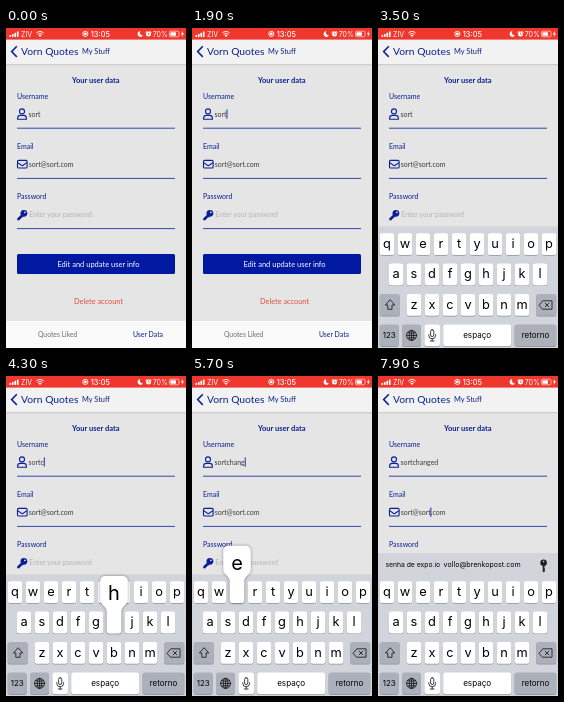
An HTML page for the animation above (8000 ms loop, 180 by 320 pixels).

```html
<!DOCTYPE html>
<html lang="en">
<head>
<meta charset="utf-8">
<title>User data form</title>
<style>
html, body { margin: 0; width: 100%; height: 100%; overflow: hidden; background: #e5e5e5; }
svg { display: block; width: 100vw; height: 100vh; }
text { font-family: Lato, "Open Sans", sans-serif; font-size: 7px; fill: #0a2090; white-space: pre; }
.sys, .sys text { font-family: Inter, Roboto, sans-serif; fill: #000; }
.status text { fill: #fff; }
.mid { text-anchor: middle; }
.line { fill: none; stroke: #0a1e96; }
.glyph { fill: none; stroke: #111; stroke-width: .8; stroke-linejoin: round; stroke-linecap: round; }
#balloon { filter: drop-shadow(0 .6px 1.4px rgba(0, 0, 0, .4)); }
</style>
</head>
<body>
<svg id="stage" viewBox="0 0 180 320" preserveAspectRatio="none">
  <defs>
    <linearGradient id="shade" x1="0" y1="0" x2="0" y2="1">
      <stop offset="0" stop-color="#c6c6c6"/><stop offset="1" stop-color="#e5e5e5"/>
    </linearGradient>
  </defs>
  <rect width="180" height="320" fill="#e5e5e5"/>

  <!-- header -->
  <rect y="11" width="180" height="25" fill="#f2f2f2"/>
  <rect y="36" width="180" height="2" fill="url(#shade)"/>
  <path class="line" d="M10.8 18.3 5.6 23.6 10.8 28.9" stroke-width="1.5"/>
  <text x="15" y="27.2" style="font-size:10.3px">Vorn Quotes</text>
  <text x="76" y="26.4" style="font-size:7.4px">My Stuff</text>

  <!-- status bar -->
  <g class="sys status">
    <rect width="180" height="11.6" fill="#f0372d"/>
    <g fill="#fff">
      <rect x="3.4" y="6.9" width="1.7" height="2" rx=".4"/>
      <rect x="5.9" y="5.9" width="1.7" height="3" rx=".4"/>
      <rect x="8.4" y="4.7" width="1.7" height="4.2" rx=".4"/>
      <rect x="10.9" y="3.4" width="1.7" height="5.5" rx=".4"/>
      <path d="M34 9.1 32.5 7.5A2.2 2.2 0 0 1 35.5 7.5Z"/>
      <circle cx="79.3" cy="5.9" r="1.4"/>
      <path d="M134.3 3.1A2.9 2.9 0 1 0 137 7.4 2.8 2.8 0 0 1 134.3 3.1Z"/>
      <circle cx="142.5" cy="6.1" r="2.5"/>
      <rect x="164.4" y="4.2" width="5.6" height="3.6" rx=".6"/>
      <path d="M177 2.8 174.8 6.3H176.2L175.6 9.1 178 5.4H176.5Z"/>
    </g>
    <g fill="none" stroke="#fff" stroke-width=".9">
      <path d="M31.6 6.5A3.4 3.4 0 0 1 36.4 6.5M30.3 5A5.3 5.3 0 0 1 37.7 5"/>
      <circle cx="79.3" cy="5.9" r="2.6"/>
      <path d="M139.7 4.6 141.2 3.1M145.3 4.6 143.8 3.1"/>
      <rect x="163.4" y="3.2" width="9.6" height="5.6" rx="1.3" stroke-width=".6"/>
    </g>
    <path d="M142.5 4.6V6.3H143.8" fill="none" stroke="#f0372d" stroke-width=".6"/>
    <text x="15" y="8.5" style="font-size:7px">ZIV</text>
    <text class="mid" x="94.3" y="8.6" style="font-size:7.4px;font-weight:500">13:05</text>
    <text x="146.7" y="8.5" style="font-size:7px">70%</text>
  </g>

  <!-- form -->
  <text class="mid" x="89.8" y="54.9" style="font-size:7.5px;font-weight:700">Your user data</text>
  <text x="11" y="70.6">Username</text>
  <text x="11" y="120.7">Email</text>
  <text x="11" y="171">Password</text>
  <path class="line" d="M11 100.2H169M11 150.4H169M11 200.6H169" stroke-width=".8"/>
  <g class="line" stroke-width="1.1">
    <circle cx="16" cy="83.4" r="2.5"/>
    <path d="M11.6 91.2V90.2Q11.6 87.4 14.4 87.4H17.6Q20.4 87.4 20.4 90.2V91.2Z"/>
    <rect x="11.5" y="132.4" width="9.6" height="7.6" rx="1.1"/>
    <path d="M11.7 134.6 15.4 137.3Q16.3 137.9 17.2 137.3L20.9 134.6"/>
  </g>
  <path d="M15 186.8 11.2 190.6V192.3H13.8V191H15V189.8H16.2L17.3 188.6Z" fill="#0a1e96"/>
  <circle cx="17.9" cy="185.3" r="3.4" fill="#0a1e96"/>
  <circle cx="18.9" cy="184.3" r=".9" fill="#e5e5e5"/>
  <text id="user" x="22.4" y="88.5" style="fill:#3a3a3a"></text>
  <text id="mail" x="22.8" y="138.7" style="fill:#3a3a3a">sort@sort.com</text>
  <text x="23.2" y="189.3" style="fill:#b4b4b8">Enter your password</text>
  <rect id="caret" width="1" height="9.4" fill="#2038a8"/>

  <rect x="11" y="226" width="158" height="20" rx="1.6" fill="#0019a0"/>
  <text class="mid" x="92.5" y="238.6" style="font-size:7.5px;fill:#fff">Edit and update user info</text>
  <text class="mid" x="92.5" y="275.6" style="font-size:7.4px;fill:#dc503c">Delete account</text>
  <rect y="293" width="180" height="27" fill="#fafafa"/>
  <text class="mid" x="51.7" y="308.6" style="font-size:6.8px;fill:#6c6c70">Quotes Liked</text>
  <text class="mid" x="142" y="308.6" style="font-size:6.9px">User Data</text>

  <!-- keyboard -->
  <g id="board" class="sys">
    <g id="bar">
      <rect y="177" width="180" height="23" fill="#d1d4da"/>
      <text x="7.4" y="191.4" style="font-size:6.8px">senha de expo.io</text>
      <text x="65.6" y="191.4" style="font-size:7.1px">vollo@brenkopost.com</text>
      <circle cx="165.6" cy="186.8" r="3.3" fill="#222"/>
      <circle cx="165.6" cy="185.6" r=".8" fill="#d1d4da"/>
      <path d="M164.7 189V195.4L165.7 196.6 167.2 195 166.4 194 167.2 193 166.5 192V189Z" fill="#222"/>
    </g>
    <rect y="198.5" width="180" height="122" fill="#d1d4da"/>
    <g id="keys"></g>
    <g class="glyph">
      <path d="M11.9 272 7.4 277H9.8V281.3H14V277H16.4Z"/>
      <path d="M161.3 277 164.8 272.8H174V281.2H164.8ZM167.2 275.2 170.8 278.8M170.8 275.2 167.2 278.8"/>
      <circle cx="33.6" cy="307.4" r="5"/>
      <ellipse cx="33.6" cy="307.4" rx="2.3" ry="5"/>
      <path d="M28.6 307.4H38.6M33.6 302.4V312.4M29.6 304.7Q33.6 306 37.6 304.7M29.6 310.1Q33.6 308.8 37.6 310.1"/>
      <rect x="52.6" y="301.8" width="3.2" height="6.8" rx="1.6"/>
      <path d="M50.8 306.6V307.4A3.4 3.4 0 0 0 57.6 307.4V306.6M54.2 310.8V312.9M52.3 313H56.1"/>
    </g>
    <g id="pop">
      <path id="balloon" fill="#fff"/>
      <text id="letter" class="mid" style="font-size:20px"></text>
    </g>
  </g>
</svg>
<script>
const $ = id => document.getElementById(id);
const NS = 'http://www.w3.org/2000/svg';
const LOOP = 8000, STEP = 100;
const KEY_W = 14.6, KEY_H = 21.8, PITCH = 18;
const rowY = r => 205.2 + r * 30.4;

function add(tag, attrs, text) {
  const el = document.createElementNS(NS, tag);
  for (const k in attrs) el.setAttribute(k, attrs[k]);
  if (text) el.textContent = text;
  $('keys').append(el);
}

function key(x, y, w, fill, label, size, dy) {
  add('rect', { x, y: y + .7, width: w, height: KEY_H, rx: 2.6, fill: '#8e9197' });
  add('rect', { x, y, width: w, height: KEY_H, rx: 2.6, fill });
  if (label) add('text', { x: x + w / 2, y: y + dy, class: 'mid', style: `font-size:${size}px` }, label);
}

const spots = {};
['qwertyuiop', 'asdfghjkl', 'zxcvbnm'].forEach((row, r) => {
  [...row].forEach((ch, i) => {
    const x = [9, 18, 36][r] + i * PITCH;
    spots[ch] = { x, y: rowY(r) };
    key(x - KEY_W / 2, rowY(r), KEY_W, '#fff', ch, 12.8, 14.8);
  });
});
const GREY = '#abb0ba';
key(1.7, rowY(2), 20, GREY);
key(158.2, rowY(2), 20, GREY);
key(1.7, rowY(3), 19, GREY, '123', 8, 13.9);
key(24, rowY(3), 19, GREY);
key(46.4, rowY(3), 15.6, '#fff');
key(65.2, rowY(3), 68, '#fff', 'espaço', 8.1, 13.5);
key(136.6, rowY(3), 41.7, GREY, 'retorno', 8, 13.5);

// [character, press time]; the character lands on release
const HOLD = 200;
const presses = [['c', 3800], ['h', 4200], ['a', 4500], ['n', 4800],
                 ['g', 5200], ['e', 5600], ['d', 6100]];
const FOCUS_USER = 1850, FOCUS_MAIL = 7400, SLIDE = 1950, SLIDE_MS = 400;

function showPop(ch) {
  $('pop').style.display = ch ? '' : 'none';
  if (!ch) return;
  const { x, y } = spots[ch];
  $('balloon').setAttribute('d', `M${x - 13.8} ${y - 30}q0-5.5 5.5-5.5h16.6q5.5 0 5.5 5.5v18` +
    'c0 6-6.5 6-6.5 12v18.8q0 3-3 3h-8.6q-3 0-3-3v-18.8c0-6-6.5-6-6.5-12z');
  $('letter').textContent = ch;
  $('letter').setAttribute('x', x);
  $('letter').setAttribute('y', y - 11.5);
}

function placeCaret(t, lastTyped) {
  const onMail = t >= FOCUS_MAIL;
  const since = t - (onMail ? FOCUS_MAIL : lastTyped);
  const typing = t >= presses[0][1] && t < 6300;
  const on = t >= FOCUS_USER && (typing || since % 1000 < 620);
  $('caret').style.display = on ? '' : 'none';
  const width = onMail ? $('mail').getSubStringLength(0, 9) : $('user').getComputedTextLength();
  $('caret').setAttribute('x', 22.4 + width);
  $('caret').setAttribute('y', onMail ? 131.5 : 81.3);
}

function draw(t) {
  const done = presses.filter(p => t >= p[1] + HOLD);
  $('user').textContent = 'sort' + done.map(p => p[0]).join('');
  const down = presses.find(p => t >= p[1] && t < p[1] + HOLD);
  showPop(down && down[0]);
  placeCaret(t, done.length ? done[done.length - 1][1] + HOLD : FOCUS_USER);

  const k = Math.min(1, Math.max(0, (t - SLIDE) / SLIDE_MS));
  $('board').setAttribute('transform', `translate(0 ${122 * (1 - k) ** 3})`);
  $('bar').style.display = t >= FOCUS_MAIL + 100 ? '' : 'none';
}

const start = performance.now();
function tick(now) {
  const t = Math.max(0, now - start) % LOOP;
  draw(Math.floor(t / STEP) * STEP);
  requestAnimationFrame(tick);
}
tick(start);
</script>
</body>
</html>
```
